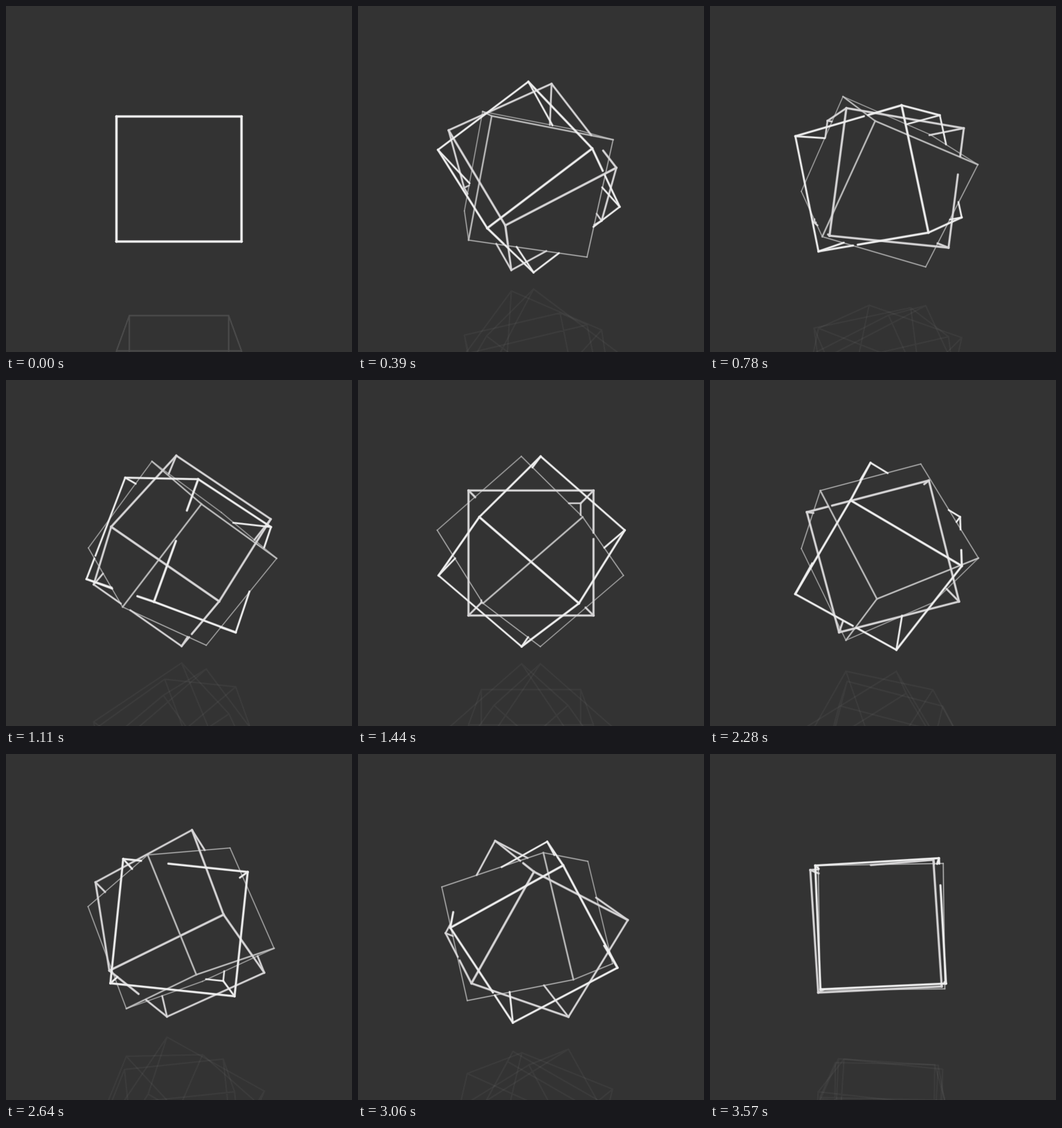
These frames come from a looping animation (500 by 500 pixels, 3.6 s). An HTML page with a canvas:

```html
<!DOCTYPE html>
<html lang="en">
<head>
<meta charset="utf-8">
<title>Three turning cubes</title>
<style>
  html, body { margin: 0; width: 100%; height: 100%; overflow: hidden; background: #333; }
  canvas { display: block; width: 500px; height: 500px; }
</style>
</head>
<body>
<canvas id="stage"></canvas>
<script>
const SIZE = 500, MID = 250, LOOP = 3600, STEP = 30;
const HALF = 80, CAM = 700, FLOOR = 150, BG = '#333';
const WEIGHT = 2.8, INNER = 2.1, OUTLINE = 1.4, SOFT = 0.7;

const canvas = document.getElementById('stage');
const ctx = canvas.getContext('2d');
const ratio = window.devicePixelRatio || 1;
canvas.width = canvas.height = SIZE * ratio;
ctx.scale(ratio, ratio);
ctx.lineCap = ctx.lineJoin = 'round';

// Quarter turns per loop; only the first cube is solid.
const SOLID = { turns: 1, color: '#bebebe' };
const WIRES = [{ turns: 5, color: '#d6d5d6' }, { turns: 4, color: '#eeeeee' }];

// Corner index bits give the signs along the x, y and z axes.
const sign = (i, axis) => (i >> axis & 1) ? 1 : -1;
const EDGES = [];
for (let i = 0; i < 8; i++)
  for (let axis = 0; axis < 3; axis++)
    if (!(i >> axis & 1)) EDGES.push([i, i | 1 << axis, axis]);

// Columns of Ry(a) * Rx(-a) * Rz(a).
function axesAt(a) {
  const c = Math.cos(a), s = Math.sin(a);
  const turnY = ([x, y, z]) => [c * x + s * z, y, c * z - s * x];
  return [[c, c * s, -s * s], [-s, c * c, -s * c], [0, s, c]].map(turnY);
}

const dot = (p, q) => p[0] * q[0] + p[1] * q[1] + p[2] * q[2];
const mix = (p, q, k) => p.map((v, i) => v + (q[i] - v) * k);
const zoom = p => CAM / (CAM - p[2]);
const project = p => [MID + p[0] * zoom(p), MID + p[1] * zoom(p)];
const mirror = p => [p[0], 2 * FLOOR - p[1], p[2]];

function pose(cube, phase) {
  const axes = axesAt(cube.turns * phase * Math.PI / 2);
  const corners = [];
  for (let i = 0; i < 8; i++)
    corners.push([0, 1, 2].map(k =>
      HALF * axes.reduce((sum, axis, j) => sum + sign(i, j) * axis[k], 0)));
  return { axes, corners, color: cube.color };
}

function stroke(width, alpha) {
  ctx.lineWidth = width;
  ctx.globalAlpha = alpha;
  ctx.stroke();
  ctx.globalAlpha = 1;
}

// A line with a soft rim.
function line(p, q, color, weight) {
  const width = weight * (zoom(p) + zoom(q)) / 2;
  ctx.beginPath();
  ctx.moveTo(...project(p));
  ctx.lineTo(...project(q));
  ctx.strokeStyle = color;
  stroke(width + SOFT, 0.4);
  stroke(width - SOFT, 1);
}

function drawReflection({ corners }) {
  ctx.beginPath();
  for (const [i, j] of EDGES) {
    ctx.moveTo(...project(mirror(corners[i])));
    ctx.lineTo(...project(mirror(corners[j])));
  }
  ctx.strokeStyle = '#fff';
  stroke(2.2, 0.04);
}

// Does the face on this side of the axis look at the camera?
const facing = (axes, axis, side) => side * axes[axis][2] * CAM > HALF;

function drawSolid({ axes, corners, color }) {
  for (const [i, j, along] of EDGES) {
    const seen = [0, 1, 2].filter(k => k !== along && facing(axes, k, sign(i, k))).length;
    if (seen) line(corners[i], corners[j], color, seen === 2 ? INNER : OUTLINE);
  }
}

// Slab test along the sight line to p.
function hidden(p, axes) {
  const limit = HALF - 0.4;
  let near = 0, far = 1;
  for (const axis of axes) {
    const from = axis[2] * CAM, d = dot(axis, p) - from;
    if (Math.abs(d) < 1e-9) {
      if (Math.abs(from) > limit) return false;
      continue;
    }
    const a = (-limit - from) / d, b = (limit - from) / d;
    near = Math.max(near, Math.min(a, b));
    far = Math.min(far, Math.max(a, b));
  }
  return near < far && near < 0.9995;
}

function drawWire({ corners, color }, blocker) {
  const parts = 160;
  for (const [i, j] of EDGES) {
    const p = corners[i], q = corners[j];
    let start = -1;
    for (let n = 0; n <= parts + 1; n++) {
      const shown = n <= parts && !hidden(mix(p, q, n / parts), blocker);
      if (shown && start < 0) start = n;
      if (!shown && start >= 0) {
        if (n - 1 > start)
          line(mix(p, q, start / parts), mix(p, q, (n - 1) / parts), color, WEIGHT);
        start = -1;
      }
    }
  }
}

function draw(ms) {
  const phase = Math.floor(ms % LOOP / STEP) * STEP / LOOP;
  const solid = pose(SOLID, phase);
  const wires = WIRES.map(w => pose(w, phase));
  ctx.fillStyle = BG;
  ctx.fillRect(0, 0, SIZE, SIZE);
  [solid, ...wires].forEach(drawReflection);
  drawSolid(solid);
  wires.forEach(w => drawWire(w, solid.axes));
}

const begin = performance.now();
function tick() {
  draw(performance.now() - begin);
  requestAnimationFrame(tick);
}
tick();
</script>
</body>
</html>
```
